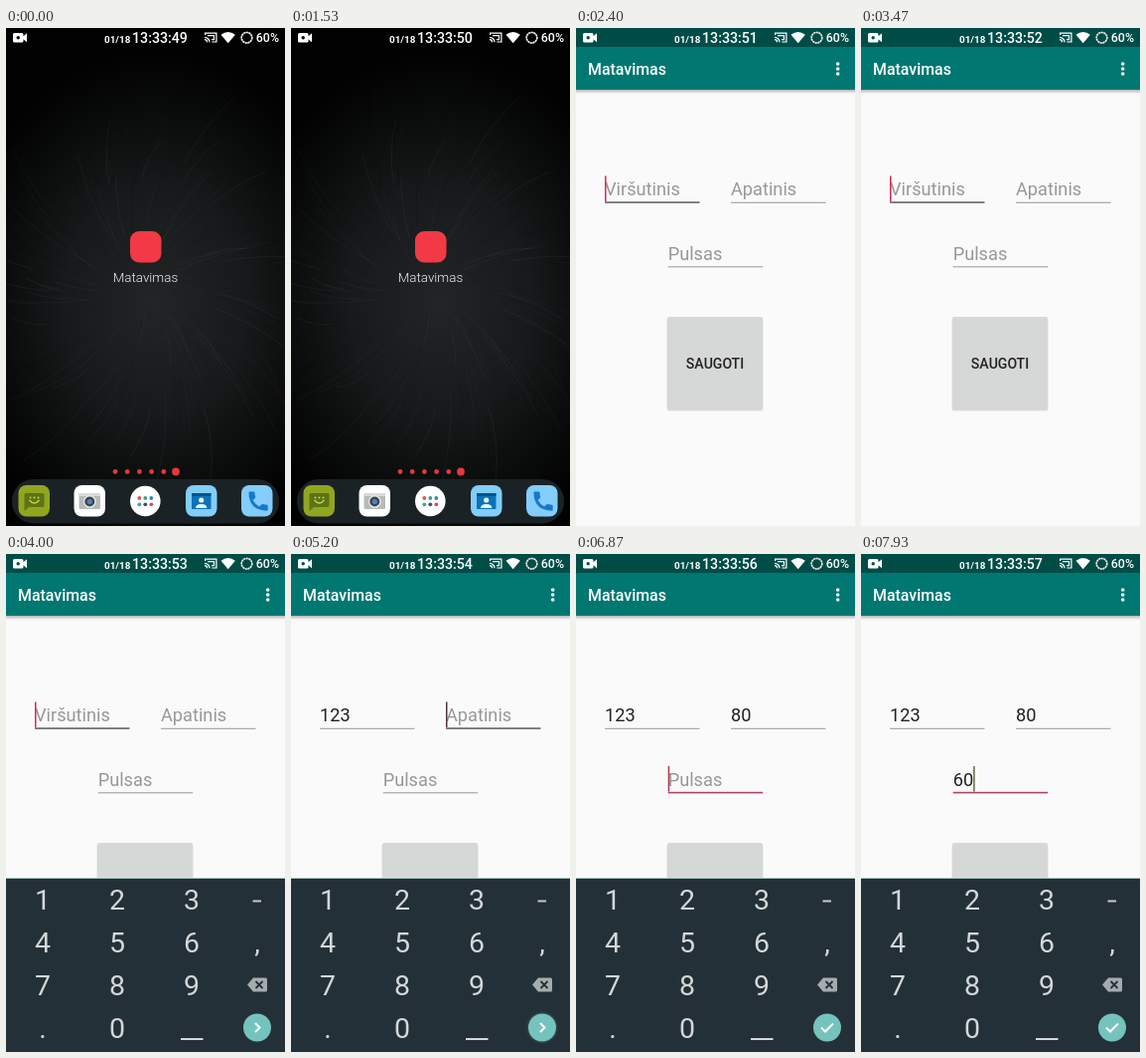
Recreate the animation shown at these times as an HTML page. Size 281 by 500 pixels, loop 8 s.

```html
<!DOCTYPE html>
<html lang="lt">
<head>
<meta charset="utf-8">
<title>Matavimas</title>
<style>
  html, body { margin: 0; width: 100%; height: 100%; overflow: hidden; background: #000; }
  svg { display: block; width: 100vw; height: 100vh; font-family: Roboto, "Open Sans", sans-serif; }
  .medium { font-weight: 500; }
  .bold { font-weight: 600; }
  .mid { text-anchor: middle; }
  .input { font-size: 18.2px; }
</style>
</head>
<body>
<svg viewBox="0 0 281 500" preserveAspectRatio="none">
  <defs>
    <radialGradient id="glow" gradientUnits="userSpaceOnUse" cx="0" cy="0" r="1" gradientTransform="translate(150 275) scale(205 255)">
      <stop offset="0" stop-color="#222526"/>
      <stop offset=".45" stop-color="#17191a"/>
      <stop offset=".8" stop-color="#080909"/>
      <stop offset="1" stop-color="#010101"/>
    </radialGradient>
    <linearGradient id="shade" x1="0" y1="0" x2="0" y2="1">
      <stop offset="0" stop-color="#000" stop-opacity=".28"/>
      <stop offset="1" stop-color="#000" stop-opacity="0"/>
    </linearGradient>
    <clipPath id="keyArea"><rect y="325" width="281" height="175"/></clipPath>
  </defs>

  <g id="home">
    <rect width="281" height="500" fill="url(#glow)"/>
    <g id="strokes" fill="none" stroke-width="1"></g>
    <rect x="125" y="204" width="31.5" height="31.5" rx="9" fill="#f13a45"/>
    <text class="mid" x="140.5" y="255" font-size="13.4" font-weight="300" fill="#f4f4f4">Matavimas</text>
    <g id="pages" fill="#e5383b"></g>
    <rect x="6" y="453" width="269" height="44.5" rx="22" fill="#1b2225"/>
    <g id="tiles"></g>
    <path d="M20 467h17a1.5 1.5 0 0 1 1.5 1.5v11a1.500 1.500 0 0 1-1.500 1.500h-14l-4.500 4v-16.500a1.500 1.500 0 0 1 1.500-1.500z" fill="#5b7416"/>
    <path d="M23.500 474q5 6 10 0" fill="none" stroke="#c8d64b" stroke-width="1.300"/>
    <g fill="#c8d64b"><circle cx="24.500" cy="471.500" r="1"/><circle cx="28.500" cy="471.500" r="1"/><circle cx="32.500" cy="471.500" r="1"/></g>
    <rect x="73.500" y="467" width="21.500" height="16" rx="1.500" fill="#b6babb"/>
    <rect x="73.500" y="467" width="21.500" height="3" fill="#d9dcdc"/>
    <circle cx="84.300" cy="475.500" r="6.300" fill="#eceff0"/>
    <circle cx="84.300" cy="475.500" r="5" fill="#37474f"/>
    <circle cx="84.300" cy="475.500" r="2.600" fill="#5383b5"/>
    <circle cx="140.300" cy="475" r="15.300" fill="#fff"/>
    <g id="drawer"></g>
    <path d="M187 467h19.500v16h-19.500z" fill="#0b72b9"/>
    <path d="M187 467h19.500v3h-19.500z" fill="#075488"/>
    <circle cx="196.700" cy="474" r="2.600" fill="#e6f6ff"/>
    <path d="M191 482q0-4 5.700-4t5.700 4z" fill="#e6f6ff"/>
    <path d="M245.500 465.500h4q1 0 1 1 0 2 .7 4 .2.800-.4 1.400l-2.200 2.200q2.300 4.300 6.500 6.500l2.200-2.200q.6-.6 1.400-.4 2 .7 4 .7 1 0 1 1v4q0 1-1 1-18.200-.5-18.200-18.200 0-1 1-1z" fill="#1878c8"/>
  </g>

  <g id="app">
    <rect width="281" height="540" fill="#fafafa"/>
    <rect width="281" height="19" fill="#004d48"/>
    <g id="content">
      <rect y="19" width="281" height="43" fill="#007871"/>
      <rect y="62" width="281" height="4" fill="url(#shade)"/>
      <text class="medium" x="12" y="47" font-size="15.900" fill="#fff">Matavimas</text>
      <g fill="#fff"><circle cx="263.700" cy="36" r="1.800"/><circle cx="263.700" cy="41" r="1.800"/><circle cx="263.700" cy="46" r="1.800"/></g>
      <g id="fields"></g>
      <rect id="caret" width="1.500" height="25.500"/>
      <rect x="91.500" y="291" width="97" height="93.500" rx="2.500" fill="#000" opacity=".12"/>
      <rect x="92" y="290" width="96" height="93" rx="2" fill="#d6d7d7"/>
      <text class="mid medium" x="140" y="341.500" font-size="14.100" fill="#222">SAUGOTI</text>
    </g>
  </g>

  <g clip-path="url(#keyArea)">
    <g id="keyboard">
      <rect y="325" width="281" height="1" fill="#a9c9c5"/>
      <rect y="326" width="281" height="174" fill="#243037"/>
      <g id="ripples" fill="#fff"></g>
      <g id="keys" class="mid" font-size="28.500" fill="#d3d7d9"></g>
      <rect x="248.500" y="347.500" width="8.500" height="2" fill="#c3c8ca"/>
      <rect x="176" y="486" width="22.500" height="2" fill="#d3d7d9"/>
      <path d="M249 425.500h12.500q1.500 0 1.500 1.500v11q0 1.500-1.500 1.500h-12.500l-6-7z" fill="#a5abae"/>
      <path d="M251.500 429l7 7m0-7l-7 7" stroke="#243037" stroke-width="1.800"/>
      <circle cx="253" cy="475.500" r="14" fill="#74c3be"/>
      <path id="action" fill="none" stroke="#fff" stroke-width="2"/>
    </g>
  </g>

  <g id="status" fill="#fff">
    <path d="M8.500 5h7.500q1.500 0 1.500 1.500v1.700l3.500-3v9l-3.500-3v1.700q0 1.500-1.500 1.500h-7.500q-1.500 0-1.500-1.500v-6.400q0-1.500 1.500-1.500z"/>
    <circle id="lens" cx="12.200" cy="9.700" r="1.700"/>
    <text class="bold" x="99" y="15" font-size="9.900">01/18</text>
    <text id="clock" class="medium" x="127" y="15" font-size="14.200"></text>
    <g fill="none" stroke="#fff" stroke-width="1.200">
      <path d="M200.600 7v-1.900h11.300v8.900h-4.500"/>
      <path d="M200 9.300a5 5 0 0 1 5 5M200 11.700a2.600 2.600 0 0 1 2.600 2.600M203 7.600h6.500v4h-2.500"/>
    </g>
    <path d="M216.500 6.700q7.200-5.200 14.400 0l-7.200 8.500z"/>
    <circle cx="242.500" cy="9.700" r="5.300" fill="none" stroke="#777" stroke-width="1.500"/>
    <circle cx="242.500" cy="9.700" r="5.300" fill="none" stroke="#eee" stroke-width="1.500" stroke-dasharray="2 .7" pathLength="33.300" id="battery"/>
    <text class="medium" x="251.800" y="14.200" font-size="12.400">60%</text>
  </g>
</svg>
<script>
const LOOP = 8000;
const $ = id => document.getElementById(id);
const clamp = x => Math.max(0, Math.min(1, x));
const progress = (t, from, to) => clamp((t - from) / (to - from));
const easeOut = x => 1 - (1 - x) ** 3;

function add(parent, tag, attrs, text) {
  const el = document.createElementNS("http://www.w3.org/2000/svg", tag);
  for (const name in attrs) el.setAttribute(name, attrs[name]);
  if (text) el.textContent = text;
  parent.appendChild(el);
  return el;
}

function set(el, attrs) {
  for (const name in attrs) el.setAttribute(name, attrs[name]);
}

// Wallpaper: faint brush strokes sweeping outwards
let seed = 11;
const random = () => (seed = seed * 16807 % 2147483647) / 2147483647;
for (let i = 0; i < 150; i++) {
  const angle = random() * Math.PI * 2;
  const near = 25 + random() * 110;
  const far = near + 30 + random() * 70;
  const at = (r, turn) => `${140 + r * Math.cos(angle + turn)} ${260 + r * Math.sin(angle + turn)}`;
  add($("strokes"), "path", {
    d: `M${at(near, 0)}Q${at((near + far) / 2, .03)} ${at(far, .13)}`,
    stroke: random() < .5 ? "#000" : "#8a9498",
    opacity: .03 + random() * .06
  });
}

for (let i = 0; i < 6; i++)
  add($("pages"), "circle", { cx: 110 + i * 12.2, cy: 445.5, r: i === 5 ? 3.9 : 2.4 });

[[12.5, "#90a61f"], [68.5, "#fff"], [181, "#82cdfa"], [237, "#82cdfa"]].forEach(([x, fill]) =>
  add($("tiles"), "rect", { x, y: 459, width: 31.5, height: 31.5, rx: 8, fill }));

["#e5534b", "#3e9f8f", "#3d7fc4", "#3aa5a0", "#37536b", "#df4a62"].forEach((fill, i) =>
  add($("drawer"), "circle", { cx: 134.3 + i % 3 * 6, cy: 472 + Math.floor(i / 3) * 6.3, r: 1.9, fill }));

// Form fields; each entry is [time, text]
const fields = [
  { x: 29, y: 168, hint: "Viršutinis", typed: [[4270, "1"], [4470, "12"], [4670, "123"]], focus: 0 },
  { x: 156, y: 168, hint: "Apatinis", typed: [[6070, "8"], [6270, "80"]], focus: 5130 },
  { x: 92.7, y: 232.500, hint: "Pulsas", typed: [[7400, "6"], [7730, "60"]], focus: 6770 }
];
for (const f of fields) {
  f.label = add($("fields"), "text", { class: "input", x: f.x, y: f.y });
  f.line = add($("fields"), "rect", { x: f.x, width: 95.5 });
}

const columns = [37, 112, 187, 253];
const rows = [357, 400, 443, 486];
["123", "456,", "789", ".0"].forEach((row, r) => [...row].forEach((key, c) =>
  add($("keys"), "text", { x: columns[c], y: rows[r] }, key)));

// Key presses: [time, column, row]
const presses = [
  [4230, 0, 0], [4430, 1, 0], [4630, 2, 0], [5030, 3, 3],
  [6010, 1, 2], [6210, 1, 3], [6600, 3, 3], [7340, 2, 1], [7670, 1, 3]
].map(([time, c, r]) => ({
  time, wide: c < 3,
  el: add($("ripples"), "ellipse", { cx: columns[c], cy: rows[r] - 10.5 })
}));

const ticks = [730, 1700, 2700, 3670, 4670, 5600, 6600, 7600];
const caretResets = [2130, 3600, 4270, 4470, 4670, 5130, 6070, 6270, 6770, 7400, 7730];
const lastBefore = (list, t) => list.filter(x => x <= t).pop() ?? 0;

function drawForm(t) {
  const active = fields.filter(f => t >= f.focus).pop();
  for (const f of fields) {
    const entry = f.typed.filter(e => e[0] <= t).pop();
    const on = f === active;
    f.text = entry ? entry[1] : "";
    f.label.textContent = f.text || f.hint;
    f.label.setAttribute("fill", f.text ? "#222" : "#989898");
    set(f.line, {
      y: f.y + (on ? 6.3 : 6.8),
      height: on ? 1.6 : 1,
      fill: !on ? "#989898" : f === fields[2] ? "#b0435f" : "#666"
    });
  }
  const phase = t - lastBefore(caretResets, t);
  const colour = active === fields[0] ? "#d5284f"
    : active === fields[1] ? "#55363a"
    : active.text ? "#686544" : "#a8384f";
  set($("caret"), {
    x: active.x + (active.text ? active.label.getComputedTextLength() : 0),
    y: active.y - 19.5,
    fill: colour,
    opacity: phase % 1000 < 500 ? 1 : 0
  });
}

function drawKeyboard(t) {
  const up = easeOut(progress(t, 3600, 3870));
  set($("keyboard"), {
    transform: `translate(0 ${(1 - up) * 175})`,
    visibility: t < 3600 ? "hidden" : "visible"
  });
  $("action").setAttribute("d", t < 6770 ? "M251 471l4.500 4.500-4.500 4.500" : "M247 475.500l4 4 8-8");
  for (const p of presses) {
    const age = t - p.time;
    const grow = easeOut(progress(age, 0, 130));
    set(p.el, {
      rx: (p.wide ? 35 : 16) * grow,
      ry: 16 * grow,
      opacity: age < 0 ? 0 : .13 * (1 - progress(age, 90, 240))
    });
  }
}

function render(t) {
  const open = easeOut(progress(t, 1670, 1860));
  set($("app"), { opacity: open, transform: `translate(0 ${(1 - open) * 40})` });
  $("content").setAttribute("opacity", progress(t, 1960, 2100));
  $("lens").setAttribute("fill", t < 1700 ? "#000" : "#004d48");
  $("clock").textContent = "13:33:" + (49 + ticks.filter(x => x <= t).length);
  drawForm(t);
  drawKeyboard(t);
}

const start = performance.now();
function frame() {
  render((performance.now() - start) % LOOP);
  requestAnimationFrame(frame);
}
frame();
</script>
</body>
</html>
```
